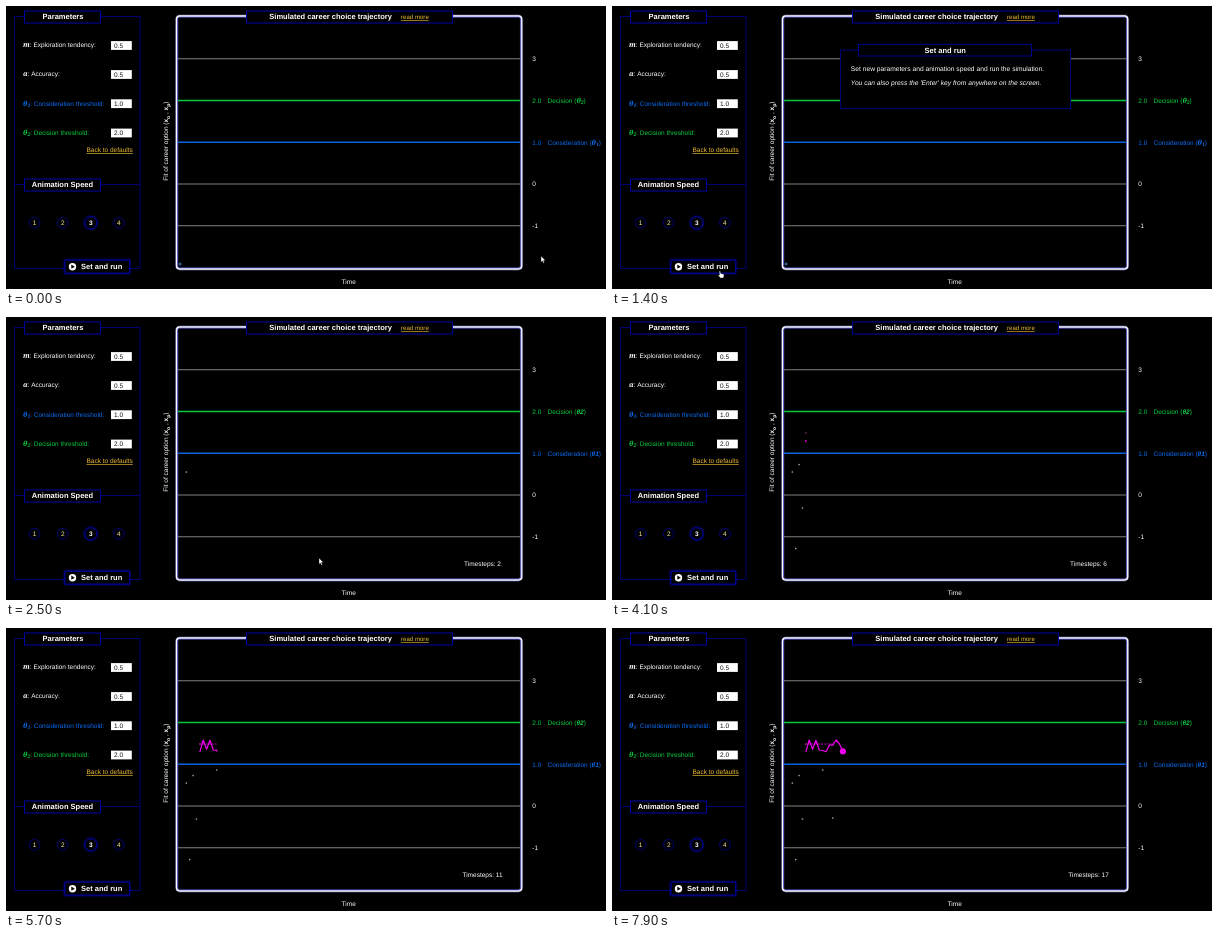
An HTML page for the animation above (8 s loop, 600x283 px).

```html
<!DOCTYPE html>
<html lang="en">
<head>
<meta charset="utf-8">
<title>Career choice simulation</title>
<style>
  html, body { margin: 0; width: 100%; height: 100%; overflow: hidden; background: #000; }
  svg { display: block; width: 600px; height: 283px; }
  text { font: 6.5px "Liberation Sans", Arial, sans-serif; fill: #fff; text-rendering: geometricPrecision; white-space: pre; }
  .head { font-size: 7.5px; font-weight: bold; text-anchor: middle; }
  .mid { text-anchor: middle; }
  .note { font-size: 6.7px; }
  .var { font: italic bold 7px "Noto Serif", serif; }
  .bold { font-weight: bold; }
  .sub { font-size: 5px; }
  .blue { fill: #0a6cf0; }
  .green { fill: #08d040; }
  .link { fill: #f0bd35; text-decoration: underline; }
  .box { fill: #000; stroke: #0000a0; stroke-width: 1; }
  .frame { fill: none; stroke: #000070; stroke-width: 1; }
  .glow { stroke: #000090; filter: drop-shadow(0 0 1.2px #0000e0); }
  .value { fill: #111; }
</style>
</head>
<body>
<svg viewBox="0 0 600 283">
  <rect width="600" height="283"/>

  <rect class="frame" x="8.5" y="10.5" width="125.5" height="252"/>
  <path class="frame" d="M8.5 178.5H134"/>
  <rect class="box" x="18.5" y="5" width="76" height="12"/>
  <text class="head" x="57" y="13.3">Parameters</text>
  <rect class="box" x="18.5" y="173" width="76" height="12"/>
  <text class="head" x="56.5" y="180.8">Animation Speed</text>

  <text x="17" y="40.8"><tspan class="var">m</tspan>: Exploration tendency:</text>
  <text x="17" y="70.3"><tspan class="var">α</tspan>: Accuracy:</text>
  <text class="blue" x="17" y="99.5"><tspan class="var">θ</tspan><tspan class="var sub" dy="1.4">1</tspan><tspan dy="-1.4">: Consideration threshold:</tspan></text>
  <text class="green" x="17" y="128.8"><tspan class="var">θ</tspan><tspan class="var sub" dy="1.4">2</tspan><tspan dy="-1.4">: Decision threshold:</tspan></text>
  <g id="inputs"></g>
  <text class="link" x="80.5" y="146">Back to defaults</text>
  <g id="speeds"></g>

  <rect class="box glow" x="59" y="254.3" width="64.5" height="12.7"/>
  <circle cx="66.5" cy="260.7" r="3.7" fill="#fff"/>
  <path d="M65.3 258.6L68.8 260.7L65.3 262.8Z"/>
  <text class="head" x="95.6" y="263">Set and run</text>

  <g fill="none">
    <rect x="170.7" y="10.2" width="344.8" height="252.6" rx="3" stroke="#8080d0" stroke-width="3.2" opacity=".5"/>
    <rect x="170.7" y="10.2" width="344.8" height="252.6" rx="3" stroke="#fff" stroke-width="1.7"/>
    <rect x="171.5" y="11" width="343.2" height="251" rx="2" stroke="#3030c8" stroke-width=".6"/>
  </g>
  <rect class="box" x="240.5" y="5" width="206" height="12"/>
  <text class="head" x="324.6" y="13.2">Simulated career choice trajectory</text>
  <text class="link" x="395" y="13" style="font-size:6.1px">read more</text>
  <g id="grid"></g>
  <text class="green" x="541.5" y="97">Decision (<tspan class="index">θ</tspan><tspan class="index sub">2</tspan><tspan class="close">)</tspan></text>
  <text class="blue" x="541.5" y="138.7">Consideration (<tspan class="index">θ</tspan><tspan class="index sub">1</tspan><tspan class="close">)</tspan></text>
  <text transform="translate(162.3 174.7) rotate(-90)">Fit of career option (<tspan class="bold">x</tspan><tspan class="bold sub" dy="1.3">o</tspan><tspan dy="-1.3"> , </tspan><tspan class="bold">x</tspan><tspan class="bold sub" dy="1.3">p</tspan><tspan dy="-1.3">)</tspan></text>
  <text class="mid" x="342.7" y="277.5">Time</text>

  <circle id="origin" cx="174.2" cy="258" r="1" fill="#123" stroke="#4c9be0" stroke-width=".7"/>
  <g id="dots" fill="#a0a0a0"></g>
  <path id="mean" fill="none" stroke="#e000e0" stroke-width=".9" stroke-dasharray="2 1.2"/>
  <polyline id="trail" fill="none" stroke="#f000f0" stroke-width="1.2" stroke-linejoin="round"/>
  <circle id="head" fill="#f000f0"/>
  <text id="count" class="mid" x="476.5" y="249.4"></text>

  <g id="popup">
    <rect class="box" x="228.5" y="44" width="230" height="58.5" style="stroke:#000078"/>
    <rect class="box" x="246.5" y="38.3" width="173" height="11.7" style="stroke:#000090"/>
    <text class="head" x="333.2" y="46.8">Set and run</text>
    <text class="note" x="238.8" y="64.6">Set new parameters and animation speed and run the simulation.</text>
    <text class="note" x="238.8" y="79.2" font-style="italic" style="font-style:italic">You can also press the 'Enter' key from anywhere on the screen.</text>
  </g>

  <g id="cursor" stroke="#000" stroke-width=".4" fill="#fff">
    <path id="arrow" d="M0 0V6.2L1.4 5L2.4 7.2L3.4 6.8L2.5 4.6H4.4Z"/>
    <path id="hand" transform="translate(-1 -.4)" d="M1.2 .4Q2 -.4 2.4 .5L2.8 2.6L5.4 3.2Q6.3 3.6 6 5L5.3 7.2H2.4L.2 4.6Q0 3.7 1.5 4.2Z"/>
  </g>
</svg>
<script>
const LOOP = 8000, FIRST = 2150, STEP = 350, CHOSEN = 6;
const $ = id => document.getElementById(id);
const clamp = v => Math.max(0, Math.min(1, v));
const ease = v => v * v * (3 - 2 * v);
const mix = (a, b, k) => a + (b - a) * k;
const show = (el, on) => el.setAttribute('visibility', on ? 'visible' : 'hidden');
const stepX = n => 173.6 + 3.37 * n;
const stepY = [124, 112, 121.3, 112.3, 122, 122.5, 123.7, 117, 117.2, 112, 116, 123.4];
const rejected = [[2, 155], [3, 231.5], [4, 147.5], [5, 191], [6, 116], [11, 142], [14, 190]];

$('inputs').innerHTML = [['0.5', 39.5], ['0.5', 68.5], ['1.0', 97.7], ['2.0', 127]].map(([v, y]) =>
  `<rect x="105" y="${y - 4.4}" width="20.8" height="8.8" fill="#fff"/><text class="value" x="108" y="${y + 2.1}">${v}</text>`).join('');

$('speeds').innerHTML = [1, 2, 3, 4].map(n => {
  const x = 0.5 + 28.1 * n, on = n === 3;
  return `<circle class="${on ? 'glow' : ''}" cx="${x}" cy="216.8" r="${on ? 6 : 5.3}" fill="#000" stroke="#000078" stroke-width="1"/>` +
    `<text class="mid${on ? ' bold' : ''}" x="${x}" y="219.1" style="fill:${on ? '#fff' : '#f2e6a8'}">${n}</text>`;
}).join('');

$('grid').innerHTML = [[3, '#909090', .9, ''], ['2.0', '#08c83c', 1.4, 'green'], ['1.0', '#0a62dc', 1.4, 'blue'], [0, '#909090', .9, ''], [-1, '#909090', .9, '']]
  .map(([v, color, w, cls]) => {
    const y = 178 - 41.75 * v;
    return `<path d="M172 ${y}H514" stroke="${color}" stroke-width="${w}"/><text class="${cls}" x="526.3" y="${y + 2.4}">${v}</text>`;
  }).join('');

$('dots').innerHTML = rejected.map(([n, y]) => `<circle cx="${stepX(n)}" cy="${y}" r=".85"/>`).join('');
const dots = [...$('dots').children];
dots[4].setAttribute('fill', '#703070');
const indices = document.querySelectorAll('.index');
const subs = document.querySelectorAll('.index.sub');
const closers = document.querySelectorAll('.close');

function drawCursor(t) {
  const go = ease(clamp((t - 300) / 800)), back = ease(clamp((t - 1900) / 400));
  const x = mix(mix(535, 107, go), 313, back);
  const y = mix(mix(250, 265.3, go), 241, back);
  const hand = t >= 1300 && t < 1950;
  $('cursor').setAttribute('transform', `translate(${x} ${y})`);
  show($('arrow'), !hand && t < 2850);
  show($('hand'), hand);
}

function drawRun(t) {
  const n = Math.floor((t - FIRST) / STEP) + 1;
  const age = t - FIRST - (n - 1) * STEP;
  const k = n - CHOSEN;
  $('count').textContent = n > 0 ? 'Timesteps: ' + n : '';
  dots.forEach((d, i) => show(d, n >= rejected[i][0]));
  for (const id of ['mean', 'trail', 'head']) show($(id), k >= 0);
  if (k < 0) return;

  const grow = k ? clamp(age / 50) : 1;
  const x = mix(stepX(n - 1), stepX(n), grow);
  const y = k ? mix(stepY[k - 1], stepY[k], grow) : stepY[0];
  const past = stepY.slice(0, k).map((v, i) => `${stepX(CHOSEN + i)},${v}`);
  $('trail').setAttribute('points', [...past, `${x},${y}`].join(' '));
  $('mean').setAttribute('d', k ? `M${stepX(CHOSEN) - .6} 116H${Math.min(x, stepX(14))}` : '');

  // The newest point swells briefly, most strongly when first chosen.
  const pulse = Math.sin(Math.PI * clamp((age - 50) / 150));
  const head = $('head');
  head.setAttribute('cx', x);
  head.setAttribute('cy', y);
  head.setAttribute('r', .9 + (k ? 2.5 : 5) * pulse);
}

function draw(t) {
  const running = t >= 1900;
  show($('popup'), t >= 1000 && !running);
  show($('origin'), !running);
  // Once running, the threshold labels lose their subscripts.
  indices.forEach(el => {
    el.style.font = running ? 'italic bold 6.5px "Liberation Sans", sans-serif'
      : `italic bold ${el.matches('.sub') ? 5 : 7}px "Noto Serif", serif`;
  });
  subs.forEach(el => el.setAttribute('dy', running ? 0 : 1.2));
  closers.forEach(el => el.setAttribute('dy', running ? 0 : -1.2));
  drawCursor(t);
  drawRun(t);
}

const start = performance.now();
function tick() {
  draw((performance.now() - start) % LOOP);
  requestAnimationFrame(tick);
}
tick();
</script>
</body>
</html>
```
